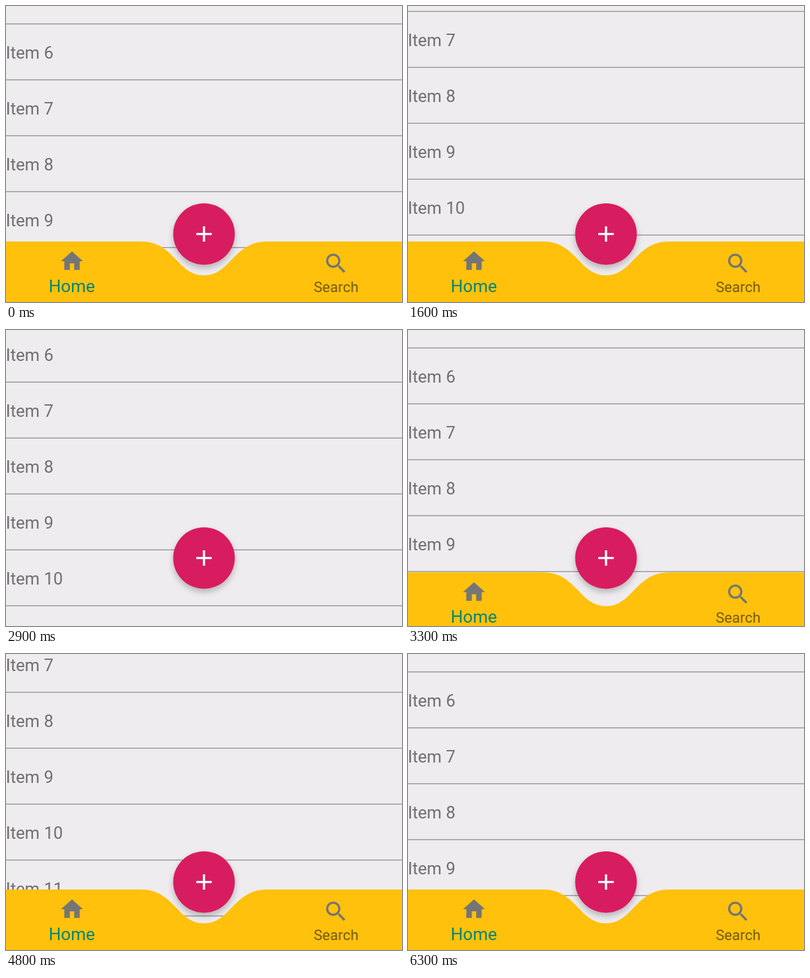
Write an HTML page that moves like this. It is 600 px wide and 450 px high and loops after 8.3 s.

```html
<!DOCTYPE html>
<html lang="en">
<head>
<meta charset="utf-8">
<title>Hiding bottom bar</title>
<style>
  html, body { margin: 0; width: 100%; height: 100%; overflow: hidden; background: #eeecee; }
  svg { display: block; width: 100vw; height: 100vh; }
  text { font-family: Roboto, sans-serif; }
  #list text { font-size: 25.6px; fill: #6f6e70; }
  #list rect { fill: #979597; }
</style>
</head>
<body>
<svg viewBox="0 0 600 450">
  <defs>
    <filter id="shadow" x="-30%" y="-30%" width="160%" height="170%">
      <feDropShadow dx="0" dy="5" stdDeviation="5" flood-color="#000" flood-opacity=".24"/>
    </filter>
  </defs>
  <rect width="600" height="450" fill="#eeecee"/>
  <g id="list"></g>
  <g id="bar">
    <path fill="#ffc10b" d="M0 358H204.3C255.6 358 259 409.4 300 409.4S344.4 358 395.7 358H600V452H0z"/>
    <g fill="#757575">
      <path transform="translate(80 368) scale(1.667)" d="M10 20v-6h4v6h5v-8h3L12 3 2 12h3v8z"/>
      <path transform="translate(480 371.5) scale(1.667)" d="M15.5 14h-.79l-.28-.27C15.41 12.59 16 11.11 16 9.5 16 5.91 13.09 3 9.5 3S3 5.91 3 9.5 5.91 16 9.5 16c1.61 0 3.09-.59 4.23-1.57l.27.28v.79l5 4.99L20.49 19l-4.99-5zm-6 0C7.01 14 5 11.99 5 9.5S7.01 5 9.5 5 14 7.01 14 9.5 11.99 14 9.5 14z"/>
    </g>
    <g text-anchor="middle">
      <text x="99.8" y="435" font-size="26" fill="#008577">Home</text>
      <text x="500.2" y="435" font-size="22.1" fill="#755a12">Search</text>
    </g>
  </g>
  <circle cx="300" cy="346.7" r="46.7" fill="#d81b60" filter="url(#shadow)"/>
  <path fill="#fff" transform="translate(280 326.7) scale(1.667)" d="M19 13h-6v6h-2v-6H5v-2h6V5h2v6h6z"/>
</svg>
<script>
const LOOP = 8300, STEP = 100, ROW = 85, TOP = 112, BAR = 94, SLIDE = 300;
const list = document.getElementById('list');
const bar = document.getElementById('bar');

const clamp = v => Math.max(0, Math.min(1, v));
const linear = p => p;
const smooth = p => p * p * (3 - 2 * p);
const accelerate = p => p * p;
const decelerate = p => p * (2 - p);

// Each swipe moves the divider below item 6 to a new height.
const swipes = [
  { start: 1200, end: 1790, to: -25, ease: smooth },
  { start: 2500, end: 3090, to: TOP, ease: smooth },
  { start: 3400, end: 4300, to: 103, ease: linear },
  { start: 4300, end: 4850, to: -30, ease: smooth },
  { start: 5600, end: 6050, to: TOP, ease: smooth }
];

// The bar leaves or returns as a swipe settles.
const slides = [
  { start: 1700, to: BAR, ease: accelerate },
  { start: 3100, to: 0, ease: decelerate },
  { start: 4800, to: BAR, ease: accelerate },
  { start: 6000, to: 0, ease: decelerate }
].map(s => ({ ...s, end: s.start + SLIDE }));

const follow = (moves, from, t) => moves.reduce((y, { start, end, to, ease }) =>
  y + (to - y) * ease(clamp((t - start) / (end - start))), from);

for (let i = 4; i <= 13; i++) {
  const y = (i - 6) * ROW;
  list.insertAdjacentHTML('beforeend',
    `<text x="-.3" y="${y - 32.5}">Item ${i}</text><rect y="${y - .4}" width="600" height="1.4"/>`);
}

function draw(time) {
  const t = Math.floor(time / STEP) * STEP;
  list.setAttribute('transform', `translate(0 ${Math.round(follow(swipes, TOP, t))})`);
  bar.setAttribute('transform', `translate(0 ${follow(slides, 0, t)})`);
}

const start = performance.now();
function tick() {
  draw((performance.now() - start) % LOOP);
  requestAnimationFrame(tick);
}
tick();
</script>
</body>
</html>
```
